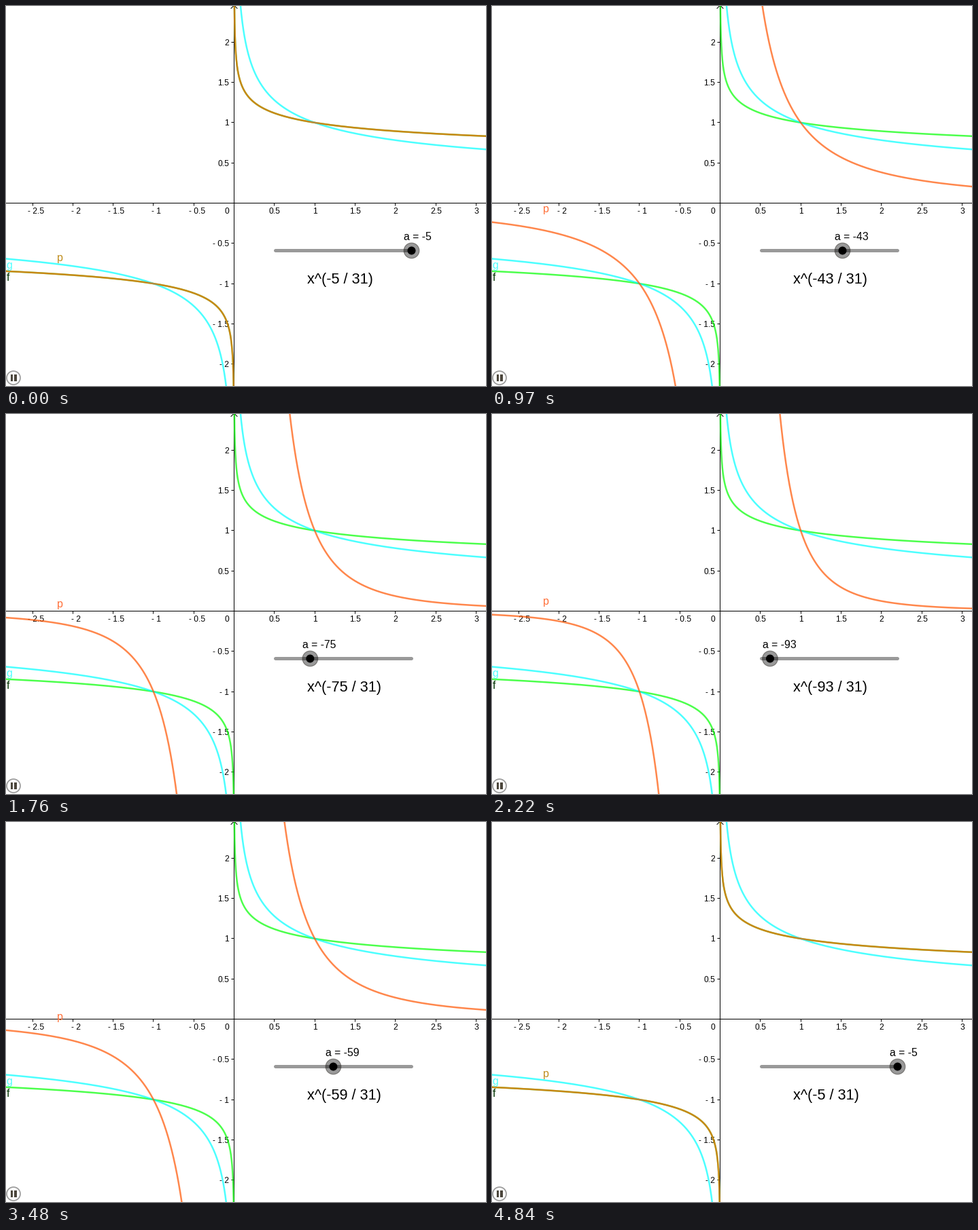
These frames come from a looping animation (706 px wide and 560 px high, 4.9 s). A matplotlib script:

```python
import matplotlib.pyplot as plt
import numpy as np
from matplotlib.animation import FuncAnimation
from matplotlib.patches import Circle, Rectangle

W, H, DPI = 706, 560, 100
OX, OY, UNIT = 335.5, 290.5, 118.6
LOOP, STEPS, TICK = 4900, 86, 20
ORANGE, GOLD = "#ff6e37", "#be8c1a"

plt.rcParams["font.family"] = "Liberation Sans"


def pt(px):
    return px * 72 / DPI


fig = plt.figure(figsize=(W / DPI, H / DPI), dpi=DPI, facecolor="white")
ax = fig.add_axes([0, 0, 1, 1])
ax.set_xlim(0, W)
ax.set_ylim(H, 0)
ax.axis("off")


def line(xs, ys, color="black", width=1.0, z=1, **kw):
    return ax.plot(xs, ys, color=color, lw=pt(width), zorder=z,
                   snap=False, **kw)[0]


def text(x, y, s, size, color="black", ha="left", z=6):
    return ax.text(x, y, s, fontsize=pt(size), color=color, ha=ha,
                   va="baseline", zorder=z)


def pixel_centre(v):
    return int(v) + 0.5


def power_curve(e):
    """Both branches of the odd power function x^e, in pixels."""
    x = np.geomspace(3 ** (1 / e), 3.2, 300)
    y = x ** e
    xs = np.concatenate([x, [np.nan], -x])
    ys = np.concatenate([y, [np.nan], -y])
    return OX + UNIT * xs, OY - UNIT * ys


def draw_axes():
    line([0, W], [OY, OY])
    line([OX, OX], [0, H])
    line([OX - 4.5, OX, OX + 4.5], [3.5, -1, 3.5])
    text(321, 306, "0", 12, z=1)
    for n in range(-5, 7):
        if n == 0:
            continue
        v = n / 2
        label = f"{'- ' if v < 0 else ''}{abs(v):g}"
        x, y = pixel_centre(OX + v * UNIT), pixel_centre(OY - v * UNIT)
        line([x, x], [OY, OY + 3.5])
        text(x + (5 if v < 0 else 0), 306, label, 12, ha="center", z=1)
        if 0 < y < H:
            line([OX - 3.5, OX], [y, y])
            text(328, y + 4.3, label, 12, ha="right", z=1)


def draw_pause_button():
    ax.add_patch(Circle((11, 548), 10, fc="#fafafa", ec="#969696",
                        lw=pt(1.6), zorder=7))
    for x in (6.5, 12):
        ax.add_patch(Rectangle((x, 543.3), 3.6, 9.4, fc="#4b463c",
                               lw=0, zorder=8))


draw_axes()
draw_pause_button()
line(*power_curve(-5 / 31), "#00ff00", 2.5, 2, alpha=0.7)
line(*power_curve(-11 / 31), "#00ffff", 2.5, 3, alpha=0.7)
p_curve = line([], [], "#ff5400", 2.5, 4, alpha=0.7)
text(0.3, 405, "f", 16, "#003300")
text(0.7, 386.5, "g", 16, "#4dffff")
p_label = text(75, 376, "p", 16)

line([396.5, 596.5], [360.5, 360.5], "#999999", 5, 2, solid_capstyle="round")
knob = Circle((0, 360.5), 11.3, fc=(0, 0, 0, 0.4), ec=(0.2, 0.19, 0.17, 0.5),
              lw=pt(1.2), zorder=5)
dot = Circle((0, 360.5), 6, fc="black", lw=0, zorder=6)
ax.add_patch(knob)
ax.add_patch(dot)
a_label = text(0, 345, "", 15.7)
formula = text(443, 409, "", 21.7)


def slider_value(t):
    """Odd integers from -5 down to -99 and back."""
    step = int((t + 5) * STEPS / LOOP)
    step = min(step, STEPS - 1 - step)
    return -5 - 2 * round(step * 47 / 42)


def update(i):
    a = slider_value(i * TICK + TICK / 2)
    e = a / 31
    p_curve.set_data(*power_curve(e))
    p_label.set_y(OY + UNIT * (OX / UNIT) ** e - 15)
    p_label.set_color(GOLD if a == -5 else ORANGE)
    x = 596.5 + 2.131 * (a + 5)
    knob.set_center((x, 360.5))
    dot.set_center((x, 360.5))
    a_label.set_x(x - 11.2)
    a_label.set_text(f"a = {a}")
    formula.set_text(f"x^({a} / 31)")
    return p_curve, p_label, knob, dot, a_label, formula


anim = FuncAnimation(fig, update, frames=LOOP // TICK, interval=TICK,
                     repeat=True, repeat_delay=0, blit=False)
plt.show()
```
